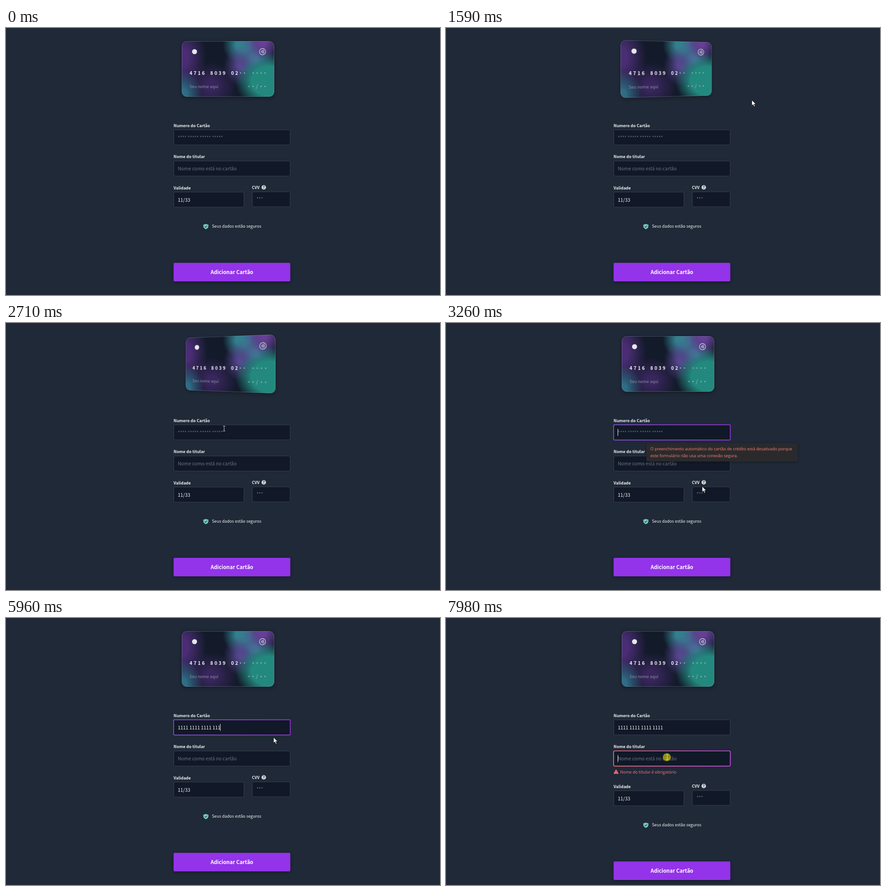
An HTML page for the animation above (8000 ms loop, 953 by 587 pixels).

```html
<!DOCTYPE html>
<html lang="pt-BR">
<head>
<meta charset="utf-8">
<title>Adicionar Cartão</title>
<style>
  html, body { margin: 0; width: 100%; height: 100%; overflow: hidden; background: #1f2937; }
  body, text { font-family: "Noto Sans CJK JP", "Noto Sans CJK SC", "Noto Sans CJK", "Open Sans", sans-serif; }
  svg { position: absolute; left: 0; top: 0; overflow: visible; }
  text { white-space: pre; }

  .scene { position: absolute; left: 386px; top: 28.5px; width: 203px; height: 122px; perspective: 437px; }
  .card { width: 100%; height: 100%; transform-style: preserve-3d; animation: flip 8s linear infinite; }
  .face { position: absolute; inset: 0; border-radius: 11px; backface-visibility: hidden;
    overflow: hidden; box-shadow: 0 3px 9px rgba(0, 0, 0, .3); }
  .face::after { content: ""; position: absolute; inset: 0; border-radius: 11px; border: 1px solid rgba(190, 205, 225, .26); }
  .front { background:
    radial-gradient(75px 62px at 192px 88px, #23897f 52%, transparent),
    radial-gradient(46px 38px at 178px 4px, #663f96 15%, transparent),
    radial-gradient(36px 44px at 128px 54px, #57468f 10%, transparent),
    radial-gradient(44px 44px at 134px 8px, #327f8d 35%, transparent),
    radial-gradient(46px 40px at 158px 38px, #4a6a99 20%, transparent),
    radial-gradient(42px 52px at 2px 116px, #2f6c86 20%, transparent),
    radial-gradient(58px 52px at 64px 98px, #38265c 20%, transparent),
    radial-gradient(54px 78px at 0 36px, #4a2d74 25%, transparent),
    #131a2a; }
  .back { transform: rotateY(180deg); background:
    radial-gradient(70px 50px at 160px 118px, #111827 40%, transparent),
    radial-gradient(56px 58px at 0 82px, #1f7d76 30%, transparent),
    radial-gradient(62px 54px at 200px 46px, #26857f 35%, transparent),
    radial-gradient(64px 36px at 180px 2px, #3b6090 25%, transparent),
    radial-gradient(78px 50px at 92px 30px, #472e72 30%, transparent),
    #141a2c; }

  @keyframes flip {
    0% { transform: rotateY(0deg); }
    9.125% { transform: rotateY(0deg); animation-timing-function: cubic-bezier(.175, .885, .32, 1.275); }
    16.625% { transform: rotateY(180deg); }
    17.625% { transform: rotateY(180deg); animation-timing-function: cubic-bezier(.175, .885, .32, 1.275); }
    24.75% { transform: rotateY(0deg); animation-timing-function: cubic-bezier(.2, .85, .5, 1); }
    29.94% { transform: rotateY(195deg); animation-timing-function: cubic-bezier(.175, .885, .32, 1.275); }
    37.44%, 100% { transform: rotateY(0deg); }
  }
  #pointer { animation: travel 8s linear infinite; }
  @keyframes travel {
    0%, 5.5% { transform: translate(884px, 298px); }
    7.75% { transform: translate(705px, 175px); }
    9.125% { transform: translate(588px, 128px); }
    11.125%, 16.375% { transform: translate(554px, 110px); }
    17.625% { transform: translate(590px, 130px); }
    19.875%, 21.875% { transform: translate(671px, 158px); }
    24.75% { transform: translate(581px, 125px); }
    27.5% { transform: translate(520px, 120px); }
    29.94% { transform: translate(490px, 152px); }
    32.5%, 37.5% { transform: translate(479px, 232px); }
    40.5% { transform: translate(560px, 366px); }
    44.25%, 91.25% { transform: translate(587px, 262px); }
    93% { transform: translate(605px, 275px); }
    97.25%, 100% { transform: translate(486px, 306px); }
  }

  .label { font-size: 8.9px; font-weight: 700; fill: #eef0f3; }
  .value { font-size: 10.4px; fill: #f9fafb; }
  .hint { font-size: 10.4px; fill: #6b7280; }
  .small { font-size: 9.1px; }
  .digits { font-size: 10.4px; font-weight: 700; letter-spacing: 2.95px; fill: #f3f4f6; }
  .field { fill: #111827; stroke: #374151; }
  .ring { fill: none; stroke-width: 1.6; }
  .tip text { font: 9px "Open Sans", "Noto Sans", sans-serif; fill: #f98072; }
  .button { fill: #9333ea; filter: drop-shadow(0 2px 3px rgba(0, 0, 0, .3)); }
</style>
</head>
<body>
<div class="scene">
  <div class="card">
    <div class="face front">
      <svg width="203" height="122">
        <circle cx="28" cy="23" r="5.5" fill="#e5e7eb"/>
        <g fill="none" stroke="#d5dae2" stroke-width="1.2" stroke-linecap="round">
          <circle cx="177.3" cy="23" r="6.8"/>
          <path d="M174.6 21.4q1 1.6 0 3.2M176.7 20.2q1.9 2.8 0 5.6M178.9 19q2.8 4 0 8"/>
        </g>
        <g class="digits">
          <text x="17" y="74">4716</text><text x="62.6" y="74">8039</text><text x="108.2" y="74">02</text>
        </g>
        <g id="dots" fill="#a9b5c1"></g>
        <text class="small" x="17" y="102.6" fill="#8a8ea3">Seu nome aqui</text>
        <text class="value" x="163" y="103.2" style="fill:#b4c2ca">/</text>
      </svg>
    </div>
    <div class="face back">
      <svg width="203" height="122">
        <path fill="#101726" d="M0 10h203v23.5H0z"/>
        <rect x="17" y="67.5" width="146.5" height="24" rx="3" fill="#d1d5db"/>
        <g fill="#6b7280"><circle cx="134.7" cy="79.3" r="1.7"/><circle cx="143.2" cy="79.3" r="1.7"/><circle cx="151.8" cy="79.3" r="1.7"/></g>
        <text class="small" x="169.3" y="83" fill="#aeb4bd">CVV</text>
      </svg>
    </div>
  </div>
</div>

<svg width="953" height="587">
  <defs>
    <linearGradient id="focus"><stop stop-color="#8250cf"/><stop offset="1" stop-color="#9333d6"/></linearGradient>
    <linearGradient id="alert"><stop stop-color="#f0707c"/><stop offset="1" stop-color="#c84be6"/></linearGradient>
  </defs>

  <text class="label" x="368" y="217.6">Numero do Cartão</text>
  <rect class="field" x="368.5" y="223.9" width="255.5" height="33" rx="2.5"/>
  <rect class="ring" data-on="2990 7980" x="368" y="223.6" width="256.4" height="33.8" rx="2.5" stroke="url(#focus)"/>
  <text class="hint" data-on="0 4010" x="377.3" y="244.6">**** ***** ***** *****</text>
  <text class="value" id="number" x="377.3" y="244.6"></text>

  <text class="label" x="368" y="286.2">Nome do titular</text>
  <rect class="field" x="368.5" y="292.4" width="255.5" height="33" rx="2.5"/>
  <rect class="ring" data-on="7980 8000" x="368" y="292.2" width="256.4" height="33.4" rx="2.5" stroke="url(#alert)"/>
  <text class="hint" x="377.3" y="313.2">Nome como está no cartão</text>

  <g data-on="7980 8000">
    <path d="M373.5 334l4.4 7.8h-8.8z" fill="#f87180" stroke="#f87180" stroke-width="1.6" stroke-linejoin="round"/>
    <path d="M373.5 336.4v2.6m0 1.3v1" stroke="#1f2937"/>
    <text class="small" x="382.3" y="341.6" fill="#f0707f">Nome do titular é obrigatório</text>
  </g>

  <g id="rest">
    <text class="label" x="368" y="354.6">Validade</text>
    <rect class="field" x="368.5" y="360.8" width="154" height="33" rx="2.5"/>
    <text class="value" x="377.3" y="381.6">11/33</text>
    <text class="label" x="540" y="353.8">CVV</text>
    <circle cx="566" cy="350.4" r="4.9" fill="#d1d5db"/>
    <text x="566" y="353.4" text-anchor="middle" font-size="8" font-weight="700" fill="#1f2937">?</text>
    <rect class="field" x="541" y="360.2" width="83" height="32.8" rx="2.5"/>
    <text class="hint" x="550" y="380.3">***</text>
    <path d="M433.4 432.2q2.8 0 5.5-1.4 2.700 1.400 5.500 1.400v3.900q0 4.200-5.500 6.300-5.500-2.100-5.500-6.300z" fill="#74cbbb"/>
    <path d="M436.400 436.300l1.900 1.900 3.400-3.600" fill="none" stroke="#1f2937" stroke-width="1.200"/>
    <text class="small" x="452.200" y="439.300" fill="#f3f4f6">Seus dados estão seguros</text>
    <rect class="button" x="368" y="516.300" width="256.300" height="40.700" rx="2.500"/>
    <text x="496.100" y="541" text-anchor="middle" font-size="11.400" font-weight="700" fill="#fff">Adicionar Cartão</text>
  </g>

  <g class="tip" data-on="3060 4690">
    <rect x="440" y="264" width="332" height="40.500" rx="2" fill="#2a2a2d" style="filter:drop-shadow(0 1px 2px rgba(0,0,0,.35))"/>
    <text x="448.800" y="280.200">O preenchimento automático do cartão de crédito está desativado porque</text>
    <text x="448.800" y="294.800">este formulário não usa uma conexão segura.</text>
  </g>

  <rect id="caret" width="1" height="15" fill="#f9fafb"/>

  <g id="pointer">
    <circle data-on="7980 8000" cx="-1" r="8.800" fill="#c4bd08" opacity=".72"/>
    <path data-on="410 2560 3060 7600" d="M.5.5v12.300l2.900-2.700 2 4.700 2.100-.9-2-4.500h4z" fill="#fff" stroke="#111" stroke-width=".8"/>
    <path data-on="2560 3060 7600 8000" d="M-2.500-5.500h2l.5.500.500-.500h2M0-5v10M-2.500 5.500h2l.5-.5.5.5h2" fill="none" stroke="#d7dade"/>
  </g>
</svg>

<script>
const LOOP = 8000;
const byId = id => document.getElementById(id);
const number = byId('number'), caret = byId('caret'), rest = byId('rest');

const dot = (x, y) => `<circle cx="${x}" cy="${y}" r="1.3"/>`;
byId('dots').innerHTML =
  [129, 137.7, 156.7, 165.4, 174.2, 182.9].map(x => dot(x, 70)).join('') +
  [147.7, 156.5, 174.2, 182.9].map(x => dot(x, 99.5)).join('');

// data-on holds pairs of start and end times in ms
const timed = [...document.querySelectorAll('[data-on]')].map(el => ({
  el, times: el.dataset.on.split(' ').map(Number)
}));
const isOn = (times, t) => times.filter(x => x <= t).length % 2 === 1;
const show = (el, on) => { el.style.visibility = on ? 'visible' : 'hidden'; };

// one key press, a key held down, then two more presses
function digitCount(t) {
  if (t < 4010) return 0;
  if (t < 4550) return 1;
  if (t < 5960) return Math.min(14, 3 + Math.floor(Math.floor((t - 4550) / 70) * 11 / 6));
  return t < 6490 ? 15 : 16;
}
const caretTimes = [2990, 3530, 4010, 5500, 5960, 7300, 7980, LOOP];

function draw(t) {
  const onName = t >= 7980;
  const digits = '1'.repeat(digitCount(t)).replace(/(.{4})(?=.)/g, '$1 ');
  if (number.textContent !== digits) number.textContent = digits;
  timed.forEach(({ el, times }) => show(el, isOn(times, t)));
  show(caret, isOn(caretTimes, t));
  const typed = digits && !onName ? number.getComputedTextLength() : 0;
  caret.setAttribute('x', Math.round(377 + typed));
  caret.setAttribute('y', onName ? 301.5 : 233);
  rest.setAttribute('transform', `translate(0 ${onName ? 19 : 0})`);
}

let start;
function tick(now) {
  start ??= now;
  draw((now - start) % LOOP);
  requestAnimationFrame(tick);
}
draw(0);
requestAnimationFrame(tick);
</script>
</body>
</html>
```
